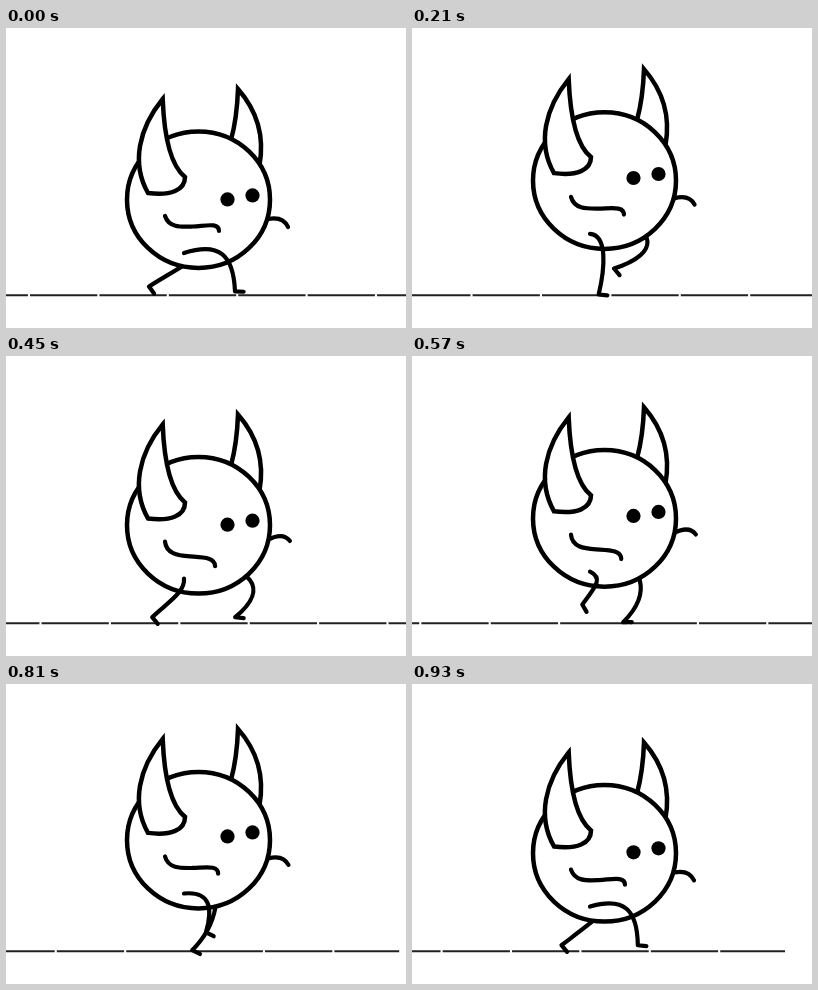
An HTML page that plays this animation: 400x300 px, repeating every 0.96 s.

```html
<!DOCTYPE html>
<html lang="en">
<head>
<meta charset="utf-8">
<title>Walk cycle</title>
<style>
  html, body { margin: 0; width: 100%; height: 100%; overflow: hidden; background: #fff; }
  svg { display: block; width: 100%; height: 100%; }
  .ink { fill: none; stroke: #000; stroke-width: 4.5; stroke-linecap: round; }
  .solid { fill: #fff; }
  .thin { stroke-width: 4.2; stroke-linejoin: round; }
  .horn { stroke-miterlimit: 8; }
</style>
</head>
<body>
<svg viewBox="0 0 400 300">
  <path id="ground" d="M-140 267.2H480" fill="none" stroke="#222" stroke-width="2" stroke-dasharray="67.3 2.1"/>
  <path id="farLeg" class="ink thin"/>
  <path id="farHorn" class="ink solid horn" d="M225 112Q231 90 232 61C253 85 258 112 253.5 137"/>
  <g id="body">
    <path id="arm" class="ink thin"/>
    <ellipse class="ink solid" cx="192.5" cy="171.7" rx="71.5" ry="68.3"/>
    <path id="mouth" class="ink thin"/>
  </g>
  <path id="nearHorn" class="ink solid horn" d="M142 165C125 135 133 100 156.7 71C158 105 164 137 179 149C179 162 165 168 142 165Z"/>
  <g id="eyes">
    <circle cx="221.5" cy="172" r="7.1"/>
    <circle cx="246.5" cy="168" r="7.1"/>
  </g>
  <path id="nearLeg" class="ink thin"/>
</svg>
<script>
const LOOP = 960, STEP = 30, GAP = 69.4, TAU = 2 * Math.PI;
const { sin, cos, abs } = Math;
const $ = id => document.getElementById(id);
const shift = (id, x, y) => $(id).setAttribute("transform", `translate(${x} ${y})`);
const draw = (id, d) => $(id).setAttribute("d", d);

// Smooth bump from 0 to 1, highest at time `peak`
const swell = (t, peak, power) => ((1 + cos(TAU * (t - peak) / LOOP)) / 2) ** power;

// Curve handles: [base, per stride, per lift], measured from hip (knee) and ankle (shin)
const near = {
  x: 178, y: 225, lead: 0,
  knee: [[14, .42, .15], [4, -.3, 0]],
  shin: [[8, -.2, .2], [-24, -.25, .25]]
};
const far = {
  x: 208, y: 213, lead: 17,
  knee: [[14, .48, .8], [4, -.18, 0]],
  shin: [[32, .16, .7], [-32, -.15, .6]]
};

function leg(l, t, bob) {
  const a = TAU * t / LOOP;
  const lift = 26 * swell(t, 690, 2.3);
  const x = 186 + 30 * cos(a) + 8 * cos(3 * a) + 5 * cos(5 * a) - 5 * sin(a) + l.lead * abs(sin(a));
  const y = 266.5 - lift, hipY = l.y + bob;
  const turn = 1.05 * swell(t, 570, 1.2);
  const handle = (ox, oy, rules) => {
    const [dx, dy] = rules.map(([base, stride, up]) => base + stride * (x - l.x) + up * lift);
    return `${ox + dx} ${oy + dy} `;
  };
  return `M${l.x} ${hipY}C${handle(l.x, hipY, l.knee)}${handle(x, y, l.shin)}${x} ${y}`
    + `l${8.6 * cos(turn)} ${8.6 * sin(turn)}`;
}

function render(t) {
  const a = TAU * t / LOOP;
  const bob = -19.6 * abs(sin(a)) ** 1.27;
  const sway = swell(t, 500, 1.2);
  const mix = (from, to) => from + (to - from) * sway;

  // The ground slows down while the body is high
  const travel = 2 * GAP * t / LOOP - 1.4 + 6.1 * cos(2 * a - 1.76) + 2.5 * cos(a);
  shift("ground", 25.2 - travel, 0);

  shift("body", 0, bob);
  shift("nearHorn", 0, bob * 1.04);
  shift("farHorn", 0, bob * 1.04);
  shift("eyes", 0, bob * 1.17 + sin(a) - .6);

  draw("mouth", `M159 188C${mix(163, 160)} 200 ${mix(175, 171)} ${mix(199, 202)} `
    + `${mix(187, 184)} ${mix(198.5, 203)}S${mix(213, 209)} ${mix(194, 204)} ${mix(213, 209)} ${mix(203, 213)}`);
  draw("arm", `M262 ${mix(191, 186)}Q277 ${mix(188, 178)} ${mix(282, 284)} ${mix(199, 187)}`);
  draw("nearLeg", leg(near, t, bob));
  draw("farLeg", leg(far, t + LOOP / 2, bob));
}

const start = performance.now();
function tick() {
  const t = (performance.now() - start) % LOOP;
  render(Math.floor(t / STEP) * STEP);
  requestAnimationFrame(tick);
}
tick();
</script>
</body>
</html>
```
